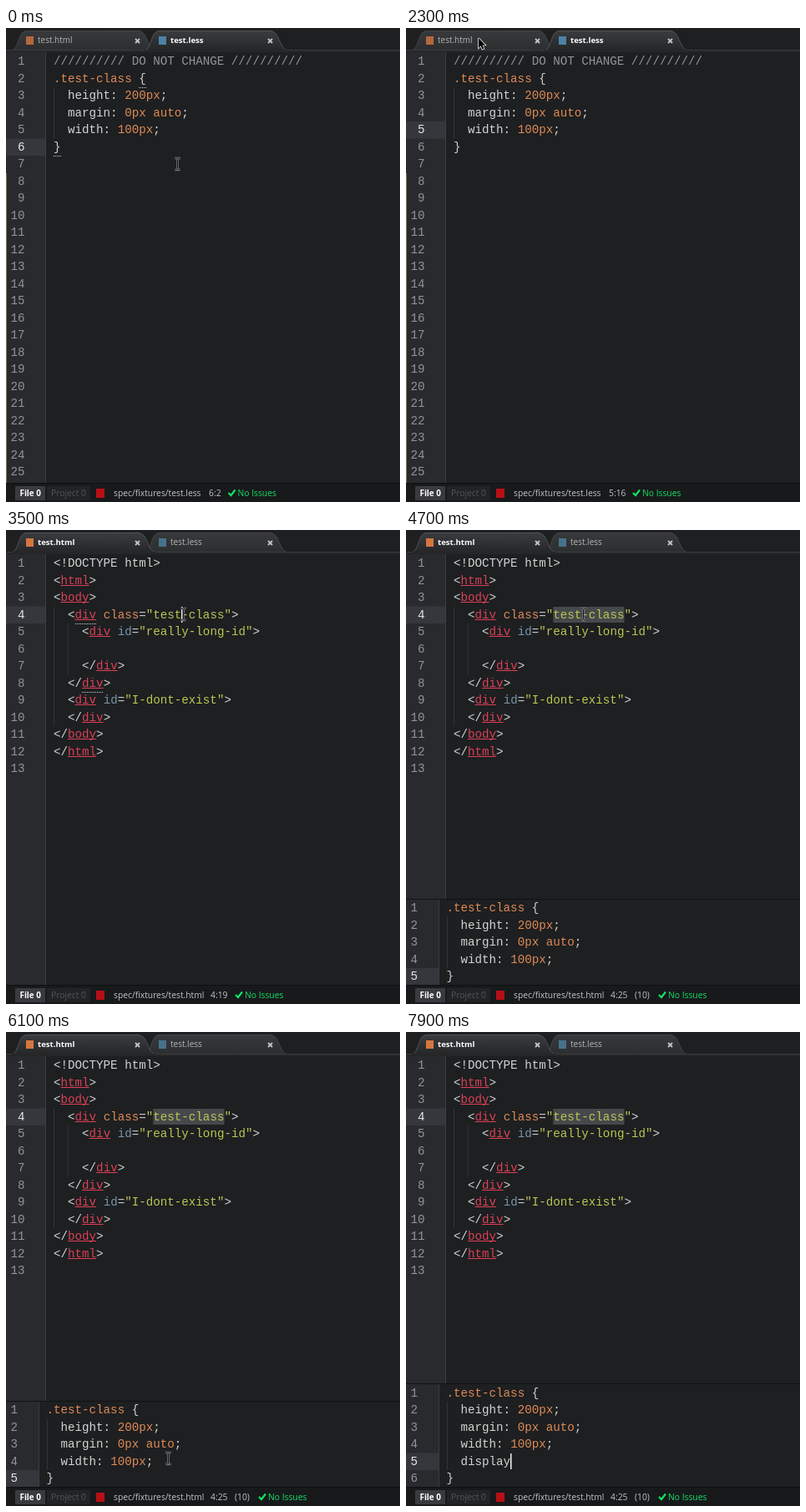
Animation, 472 px wide and 568 px high, one loop 8000 ms. Source, as an HTML page with a canvas:

```html
<!DOCTYPE html>
<html lang="en">
<head>
<meta charset="utf-8">
<title>Quick edit</title>
<style>
  html, body { margin: 0; height: 100%; overflow: hidden; background: #1d1f21; }
  canvas { display: block; }
</style>
</head>
<body>
<canvas width="472" height="568"></canvas>
<script>
const ctx = document.querySelector('canvas').getContext('2d');
const LOOP = 8000, STEP = 100, ROW = 20.5, CH = 8.52;
const MONO = '14.2px "Liberation Mono", monospace';
const UI = '"Open Sans", "Noto Sans", sans-serif';
const C = {
  bg: '#1d1f21', gutter: '#282a2e', edge: '#3b3d41', active: '#35373c', select: '#46494c',
  fg: '#d2d4d2', dim: '#929497', guide: '#303236', orange: '#e08a55', red: '#dc4056',
  green: '#bcc653', blue: '#7895ac', ok: '#12e264'
};

const RULE = ['.test-class {', '  height: 200px;', '  margin: 0px auto;', '  width: 100px;', '}'];
const LESS = ['////////// DO NOT CHANGE //////////', ...RULE];
const HTML = [
  '<!DOCTYPE html>', '<html>', '<body>', '  <div class="test-class">',
  '    <div id="really-long-id">', '', '    </div>', '  </div>',
  '  <div id="I-dont-exist">', '  </div>', '</body>', '</html>', ''
];
const LESS_TOKEN = /(\/\/.*|\.[a-z][\w-]*|\d+px|auto)/;
const HTML_TOKEN = /((?<=<\/?)\w+|class(?==)|id(?==)|"[^"]*")/;

// Pointer stops: time, x, y
const PATH = [
  [0, 205, 163], [100, 205, 163], [800, 223, 125], [1600, 223, 125], [2400, 81, 14],
  [2700, 81, 14], [3300, 212, 101], [5400, 212, 101], [6100, 194, 511], [8000, 194, 511]
];

function rect(x, y, w, h, color) {
  ctx.fillStyle = color;
  ctx.fillRect(x, y, w, h);
}

function text(s, x, y, color, font, align = 'left') {
  ctx.font = font;
  ctx.textAlign = align;
  ctx.fillStyle = color;
  ctx.fillText(s, x, y);
}

function line(points, color, width) {
  ctx.beginPath();
  points.forEach(([x, y]) => ctx.lineTo(x, y));
  ctx.strokeStyle = color;
  ctx.lineWidth = width;
  ctx.stroke();
}

function gradient(y0, y1, from, to) {
  const g = ctx.createLinearGradient(0, y0, 0, y1);
  g.addColorStop(0, from);
  g.addColorStop(1, to);
  return g;
}

function tokenColor(s) {
  if (s.startsWith('//')) return C.dim;
  if (s[0] === '"') return C.green;
  if (s === 'id') return C.blue;
  return /^(div|html|body)$/.test(s) ? C.red : C.orange;
}

const baseline = y => Math.round(y + 14);

function codeLine(s, x, y, token) {
  let col = 0;
  s.split(token).forEach((part, i) => {
    const color = i % 2 ? tokenColor(part) : C.fg;
    const px = x + col * CH;
    text(part, px, baseline(y), color, MONO);
    if (color === C.red) rect(px, baseline(y) + 1, part.length * CH, 1, color);
    col += part.length;
  });
}

// A text pane reaching down to the status bar
function editor(o) {
  const rowY = n => o.top + (n - 1) * ROW;
  const colX = c => o.left + c * CH;
  const y0 = Math.round(o.top) - 1;
  rect(0, y0, 472, 545 - y0, C.bg);
  rect(0, y0, o.gutter, 545 - y0, C.gutter);
  rect(0, rowY(o.active), o.gutter, ROW, C.active);
  rect(o.gutter, y0, 1, 545 - y0, C.edge);
  for (const [col, from, to] of o.guides)
    rect(Math.round(colX(col)), rowY(from), 1, (to - from + 1) * ROW, C.guide);
  if (o.sel) rect(colX(14), rowY(4) + 0.5, 10 * CH, 19, C.select);
  for (let n = 1; n <= o.count; n++) {
    text(n, o.numRight, baseline(rowY(n)), n === o.active ? '#e4e5e6' : C.dim, MONO, 'right');
    codeLine(o.lines[n - 1] || '', o.left, rowY(n), o.token);
  }
  for (const [row, col, len] of o.marks || [])
    for (let x = 0; x < len * CH; x += 2)
      rect(Math.round(colX(col)) + x, Math.round(rowY(row) + 20), 1, 1, '#d0d0d0');
  if (o.caret) rect(Math.round(colX(o.caret[1])), rowY(o.caret[0]) + 0.5, 1.5, 19, '#f2f2f2');
}

// glow: 0 inactive, 1 active
function tab(x, w, name, color, active, glow) {
  ctx.beginPath();
  ctx.moveTo(x, 27);
  ctx.bezierCurveTo(x + 9, 25, x + 7, 4, x + 17, 3.5);
  ctx.lineTo(x + w - 20, 3.5);
  ctx.bezierCurveTo(x + w - 9, 4, x + w - 10, 25, x + w, 27);
  ctx.fillStyle = active ? gradient(3, 27, '#3a3c3e', '#242628') : gradient(3, 27, '#38393b', '#2c2d2f');
  ctx.fill();
  ctx.strokeStyle = active ? '#505255' : '#434547';
  ctx.lineWidth = 1;
  ctx.stroke();
  ctx.globalAlpha = active ? 1 : 0.8;
  rect(x + 17, 10, 9, 10, color);
  ctx.globalAlpha = 1;
  const font = glow ? 'bold 9.6px' : '10px';
  text(name, x + 31, 18, glow ? '#fff' : '#b4b5b6', `${font} ${UI}`);
  const cx = x + 150.5;
  for (const d of [-2.5, 2.5]) line([[cx - 2.5, 15.5 - d], [cx + 2.5, 15.5 + d]], '#c4c5c6', 1.8);
}

function tabs(html, switching) {
  rect(0, 0, 472, 27, C.bg);
  const first = () => tab(7, 172, 'test.html', '#d6763f', html, html);
  const second = () => tab(166, 171, 'test.less', '#4c83a3', !html, !html || switching);
  (html ? [second, first] : [first, second]).forEach(draw => draw());
  rect(0, 26, 472, 3, '#242628');
  rect(0, 26, html ? 7 : 166, 1, '#3a3c3e');
  rect(html ? 179 : 337, 26, 472, 1, '#3a3c3e');
}

function status(file, pos, posX, count, checkX) {
  const font = `10.3px ${UI}`;
  rect(0, 545, 472, 23, '#18191b');
  rect(0, 545, 472, 1, '#0f1011');
  rect(11, 549, 36, 17, '#393a3d');
  rect(49, 549, 52, 17, '#222325');
  text('File 0', 16.5, 561, '#fff', `bold 9.8px ${UI}`);
  text('Project 0', 54, 561, '#535456', font);
  rect(108, 552, 10, 11, '#b80f16');
  text('spec/fixtures/' + file, 129, 561, '#c3c4c5', font);
  text(pos, posX, 561, '#c3c4c5', font);
  text(count, 274, 561, '#c3c4c5', font);
  line([[checkX + 1, 557], [checkX + 4, 560], [checkX + 9, 553.5]], C.ok, 2.2);
  text('No Issues', checkX + 12, 561, C.ok, font);
}

function pointer(t) {
  const i = Math.max(1, PATH.findIndex(p => p[0] > t));
  const [t0, x0, y0] = PATH[i - 1], [t1, x1, y1] = PATH[i];
  const u = (t - t0) / (t1 - t0), k = u * u * (3 - 2 * u);
  const x = Math.round(x0 + (x1 - x0) * k), y = Math.round(y0 + (y1 - y0) * k);
  if (y < 28) {
    const p = [[0, -7], [0, 5], [2.7, 2.5], [4.5, 6.5], [6.3, 5.6], [4.6, 1.8], [8, 1.5], [0, -7]]
      .map(([dx, dy]) => [x + dx, y + dy]);
    line(p, '#f4f4f4', 1.5);
    ctx.fillStyle = '#000';
    ctx.fill();
    return;
  }
  for (const [color, width] of [['#848587', 2.4], ['#141516', 1]]) {
    line([[x + .5, y - 6], [x + .5, y + 6]], color, width);
    for (const s of [-1, 1])
      line([[x - 3, y + 7 * s], [x - 1, y + 7 * s], [x + .5, y + 5.5 * s], [x + 2, y + 7 * s], [x + 4, y + 7 * s]], color, width);
  }
}

function draw(t) {
  const html = t >= 2500, moved = t >= 800;
  const selected = html && (t < 3400 || t >= 3800);
  const main = { top: 30, left: 57, numRight: 22.5, gutter: 47 };
  if (html) {
    editor({
      ...main, lines: HTML, token: HTML_TOKEN, count: 13, active: 4, sel: selected,
      guides: [[0, 4, 10], [2, 5, 7]],
      marks: selected ? [] : [[4, 3, 3], [8, 4, 3]],
      caret: !selected && [4, 18]
    });
    status('test.html', selected ? '4:25' : '4:19', 245, selected ? '(10)' : '', selected ? 302 : 274);
  } else {
    editor({
      ...main, lines: LESS, token: LESS_TOKEN, count: 25, active: moved ? 5 : 6,
      guides: [[0, 3, 5]],
      marks: moved ? [] : [[2, 12, 1], [6, 0, 1]],
      caret: moved && t < 1300 && [5, 15]
    });
    rect(0, 174, 1, 371, '#77774f');
    status('test.less', moved ? '5:16' : '6:2', 243, '', moved ? 271 : 265.5);
  }
  if (t >= 4600) {
    const entered = t >= 7000;
    const typed = 'display'.slice(0, Math.max(0, (t - 7200) / 100));
    const lines = entered ? [...RULE.slice(0, 4), '  ' + typed, '}'] : RULE;
    const n = lines.length;
    const caret = entered ? [5, 2 + typed.length] : t >= 6300 && t < 6800 && [4, 15];
    editor({
      lines, token: LESS_TOKEN, count: n, top: 545.5 - n * ROW, left: 48.5, numRight: 14,
      gutter: 39, active: entered || t < 6300 ? 5 : 4, guides: [[0, 2, n - 1]], caret
    });
    rect(0, Math.round(544 - n * ROW), 472, 1, '#111214');
    rect(0, 545, 472, 1, '#0f1011');
  }
  tabs(html, t < 2700);
  if (t < 7000) pointer(t);
}

function frame(now) {
  draw(Math.floor(now % LOOP / STEP) * STEP);
  requestAnimationFrame(frame);
}
requestAnimationFrame(frame);
</script>
</body>
</html>
```
